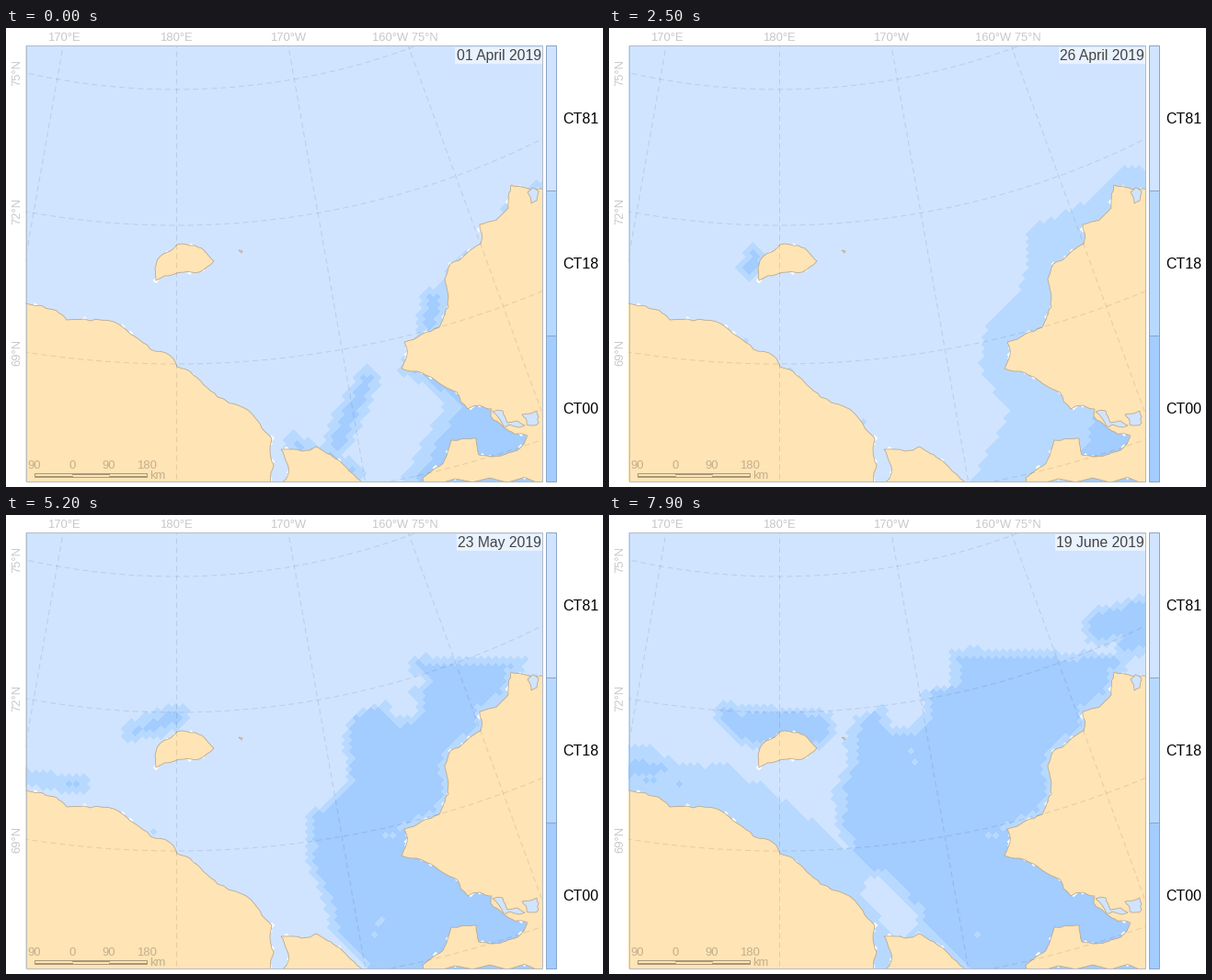
These frames come from a looping animation (649 by 500 pixels, 8000 ms). A matplotlib script:

```python
import numpy as np
import matplotlib.pyplot as plt
from matplotlib.animation import FuncAnimation
from matplotlib.patches import Polygon, Rectangle

W, H, DAYS = 649, 500, 80
LEFT, TOP, RIGHT, BOTTOM = 21, 19, 583, 494
PX = 0.72                       # points per pixel
CELL = 8                        # diagonal of an ice cell
SHADES = np.array([[208, 228, 255], [184, 217, 255], [163, 204, 255]], np.uint8)
LAND, COAST, BROWN = "#ffe4b5", "#b9a78c", "#c4b08c"
rng = np.random.default_rng(4)

# Ice cells: a lattice turned by 45 degrees
A, B = np.meshgrid(np.arange(4, 137), np.arange(-60, 73), indexing="ij")
SUM, DIF = (A + .5) * CELL - 2, (B + .5) * CELL - 4
CX, CY = (SUM + DIF) / 2, (SUM - DIF) / 2

px, py = np.meshgrid(np.arange(LEFT, RIGHT) + .5, np.arange(TOP, BOTTOM) + .5)
ROW = np.floor((px + py + 2) / CELL).astype(int) - 4
COL = np.floor((px - py + 4) / CELL).astype(int) + 60


def pairs(xy):
    return np.array(xy, float).reshape(-1, 2)


def roughen(pts, jitter=.06):
    """Split the long sides of a ring and push the new points sideways."""
    for _ in range(3):
        out = []
        for p, q in zip(pts, np.roll(pts, -1, axis=0)):
            out.append(p)
            d = q - p
            if np.hypot(*d) > 6:
                out.append((p + q) / 2 + rng.normal(0, jitter) * np.array([-d[1], d[0]]))
        pts = np.array(out)
    return pts


def distance(p, q):
    """Distance of every cell to the segment pq."""
    (x, y), (dx, dy) = p, np.subtract(q, p)
    t = np.clip(((CX - x) * dx + (CY - y) * dy) / max(dx * dx + dy * dy, 1e-9), 0, 1)
    return np.hypot(CX - x - t * dx, CY - y - t * dy)


def coast_distance(pts):
    return np.min([distance(p, q) for p, q in zip(pts[:-1], pts[1:])], axis=0)


# Land outlines from a few capes and bays
siberia = pairs((10, 293, 40, 303, 66, 318, 117, 320, 135, 333, 174, 354, 186, 369,
                 200, 374, 230, 402, 276, 431, 289, 447, 287, 459, 291, 476,
                 287, 500, 10, 500))
chukotka = pairs((298, 500, 306, 488, 299, 459, 322, 461, 337, 456, 362, 471, 394, 500))
island = pairs((163, 275, 162, 262, 171, 246, 186, 236, 206, 237, 226, 254,
                210, 266, 183, 268))
alaska = pairs((600, 170, 575, 176, 549, 171, 546, 196, 515, 214, 516, 235, 483, 257,
                477, 273, 481, 304, 471, 326, 433, 342, 436, 356, 430, 371, 471, 387,
                502, 415, 528, 415, 527, 423, 541, 435, 567, 444, 556, 460, 530, 467,
                514, 465, 511, 447, 484, 449, 479, 466, 453, 490, 452, 500, 600, 500))
SIBERIA = coast_distance(siberia[:12])
ALASKA = coast_distance(alaska[:16])

# Western limit of the open water: one line per date, x at evenly chosen heights
EDGE_Y = (150, 185, 220, 255, 290, 330, 370, 410, 450, 490)
EDGE = {
    0: (590, 552, 525, 490, 466, 447, 428, 480, 455, 430),
    11: (575, 520, 486, 455, 441, 412, 405, 450, 412, 396),
    25: (560, 524, 456, 459, 440, 412, 405, 432, 420, 396),
    34: (510, 492, 476, 422, 398, 366, 370, 344, 332, 388),
    52: (436, 450, 372, 368, 372, 328, 328, 341, 352, 388),
    69: (420, 342, 352, 300, 265, 260, 278, 308, 345, 390),
    79: (372, 366, 266, 260, 250, 247, 262, 293, 335, 385),
}


class Lead:
    """A capsule of thin ice that opens within a week, holds and closes."""

    def __init__(self, x0, y0, x1, y1, radius, first, last):
        self.dist = distance((x0, y0), (x1, y1))
        self.radius, self.first, self.last = radius, first, last

    def field(self, day):
        times = self.first - 7, self.first, self.last, self.last + 7
        r = np.interp(day, times, (-8, self.radius, self.radius, -8))
        return r - self.dist


LEADS = [
    Lead(362, 450, 392, 384, 15, 0, 3),         # strait
    Lead(314, 452, 378, 482, 11, 0, 3),
    Lead(465, 296, 461, 322, 15, 0, 3),
    Lead(520, 176, 524, 180, 33, 33, 37),       # northern cape
    Lead(540, 158, 590, 150, 9, 33, 37),
    Lead(154, 262, 160, 248, 12, 25, 46),       # island
    Lead(172, 230, 222, 222, 10, 33, 38),
    Lead(140, 236, 186, 220, 13, 50, 58),
    Lead(128, 217, 156, 242, 13, 66, 80),
    Lead(178, 224, 218, 227, 9, 66, 80),
    Lead(155, 230, 224, 232, 23, 78, 80),
    Lead(10, 284, 82, 294, 9, 50, 80),          # west
    Lead(25, 276, 58, 276, 14, 68, 80),
    Lead(590, 125, 568, 139, 20, 67, 80),       # north-east
    Lead(590, 106, 538, 122, 22, 78, 80),
]
FLOES = [
    Lead(398, 466, 411, 434, 15, 33, 36),
    Lead(410, 350, 424, 350, 9, 33, 36),
    Lead(425, 197, 432, 206, 14, 50, 55),
    Lead(326, 250, 336, 280, 14, 66, 72),
    Lead(318, 190, 322, 212, 20, 78, 80),
    Lead(292, 412, 318, 442, 16, 77, 80),
    Lead(574, 166, 592, 162, 11, 45, 80),
]
WAVES = [(*rng.uniform(-.16, .16, 2), rng.uniform(.3, .9), rng.uniform(0, 6.3))
         for _ in range(6)]


def ice_image(day):
    days = list(EDGE)
    edge = [np.interp(day, days, xs) for xs in zip(*EDGE.values())]
    north = np.interp(day, (0, 34, 52, 79), (168, 150, 156, 148))
    depth = np.interp(day, (0, 11, 25, 34, 52, 79), (13, 70, 80, 16, 7, 8))
    ragged = 1.1 * sum(np.sin(u * CX + v * CY + w * day + p) for u, v, w, p in WAVES)

    sea = np.minimum(.8 * (CX - np.interp(CY, EDGE_Y, edge)), CY - north) + ragged
    shore = np.interp(day, (20, 34, 44, 60, 69, 79), (-9, 8, -6, -6, 8, 46))
    shore = shore - SIBERIA + 1.5 * ragged
    leads = np.max([lead.field(day) for lead in LEADS], axis=0) + ragged / 2
    floes = np.max([floe.field(day) for floe in FLOES], axis=0) + ragged / 2

    open_sea = np.where((CY < 345) & (ALASKA < 6), -1, sea - depth)
    mid = (np.maximum.reduce([sea, shore, leads]) > 0) & (floes < 0)
    dark = mid & (np.maximum(open_sea, leads - 8) > 0) & (floes < -9)
    return SHADES[(mid.astype(int) + dark)[ROW, COL]]


def date_label(day):
    for month, length in (("April", 30), ("May", 31), ("June", 30)):
        if day < length:
            return f"{day + 1:02d} {month} 2019"
        day -= length


plt.rcParams["font.family"] = "Liberation Sans"
fig = plt.figure(figsize=(W / 100, H / 100), dpi=100, facecolor="white")
ax = fig.add_axes([0, 0, 1, 1])
ax.axis("off")
picture = ax.imshow(ice_image(0), extent=(LEFT, RIGHT, BOTTOM, TOP),
                    interpolation="nearest", aspect="auto")
ax.set(xlim=(0, W), ylim=(H, 0))
frame = Rectangle((LEFT, TOP), RIGHT - LEFT, BOTTOM - TOP, transform=ax.transData)


def shape(pts, face=LAND, edge=COAST, z=3):
    patch = ax.add_patch(Polygon(pts, fc=face, ec=edge, lw=.8 * PX, zorder=z))
    patch.set_clip_path(frame)


def label(x, y, text, size=13, color="#c8c8c8", **kw):
    """Text centred on its capitals."""
    drop = .1 * size
    x, y = (x + drop, y) if kw.get("rotation") else (x, y + drop)
    kw = {"ha": "center", "va": "center", "zorder": 6, **kw}
    return ax.text(x, y, text, fontsize=size * PX, color=color, **kw)


# Land, with cells without data scattered along the coast
for outline in (siberia, chukotka, island, alaska):
    coast = roughen(outline)
    shape(coast)
    for x, y in coast[rng.random(len(coast)) < .15]:
        r = rng.uniform(1.5, 3.5)
        shape([(x - r, y), (x, y - r), (x + r, y), (x, y + r)], "white", "none", 2)
shape(pairs((253, 242, 257, 243, 256, 245)))

# Lagoons
for lagoon in ((529, 418, 540, 417, 545, 430, 556, 428, 564, 433, 541, 434),
               (561, 421, 577, 417, 579, 430, 566, 432),
               (567, 179, 579, 178, 577, 188, 571, 191)):
    shape(roughen(pairs(lagoon), .12), SHADES[0] / 255)

# Graticule around the pole
POLE_X, POLE_Y = 184.5, -675


def grid_line(radius, angle):
    x = POLE_X + radius * np.sin(np.radians(angle))
    y = POLE_Y + radius * np.cos(np.radians(angle))
    line, = ax.plot(x, y, color="black", alpha=.1, lw=PX, dashes=(6, 4), zorder=4)
    line.set_clip_path(frame)


for angle in (-10, 0, 10, 20):
    grid_line(np.linspace(690, 1250, 2), angle)
for radius in (742, 890, 1041, 1192):
    grid_line(radius, np.linspace(-14, 32, 150))

ax.add_patch(Rectangle((21.5, 18.5), 561, 475, fill=False, ec="#b4bcc6", lw=PX, zorder=5))

for x, text in ((63, "170°E"), (185, "180°E"), (307, "170°W"), (434, "160°W 75°N")):
    label(x, 10, text)
for y, text in ((49, "75°N"), (200, "72°N"), (353, "69°N")):
    label(11, y, text, rotation=90)

# Scale bar
for x, text in ((31, "90"), (72, "0"), (112, "90"), (153, "180")):
    label(x, 476, text, color=BROWN)
label(156, 487, "km", color=BROWN, ha="left")
ax.add_patch(Rectangle((30.5, 484.5), 122, 4, fc=LAND, ec="#a8977a", lw=PX, zorder=5))
for x0, x1, y in ((31, 72, 487.5), (72, 112, 485.5), (112, 153, 487.5)):
    ax.plot([x0, x1], [y, y], color="#a8977a", lw=PX, zorder=6)

# Legend
for i, text in enumerate(("CT81", "CT18", "CT00")):
    y = 18.5 + i * 158.4
    ax.add_patch(Rectangle((587, y), 10.6, 158.4, fc=SHADES[i] / 255,
                           ec="#8ba5c6", lw=PX))
    label(605, y + 79, text, 16, "black", ha="left")

date = label(582, 28.5, "", 15.8, "#444444", ha="right",
             bbox=dict(fc="white", alpha=.55, ec="none", pad=1))


def update(day):
    picture.set_data(ice_image(day))
    date.set_text(date_label(day))
    return picture, date


anim = FuncAnimation(fig, update, frames=DAYS, interval=100, repeat=True, repeat_delay=0)
plt.show()
```
